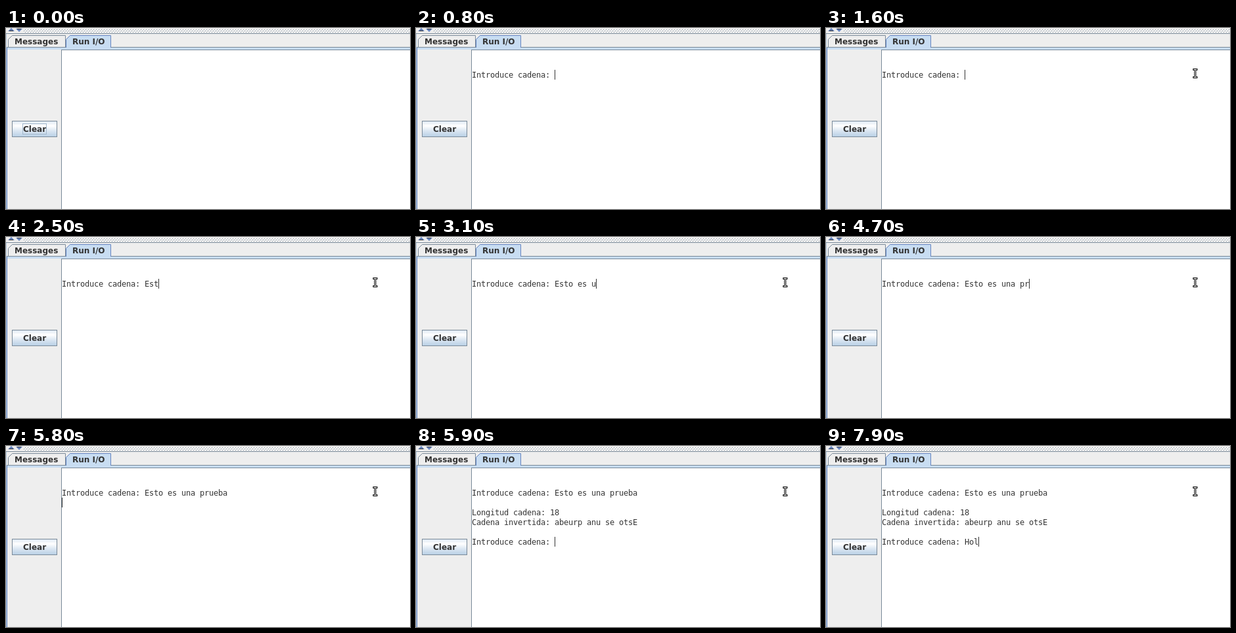
An HTML page that plays this animation: 615x277 px, repeating every 8000 ms.

```html
<!DOCTYPE html>
<html lang="es">
<head>
<meta charset="utf-8">
<title>Run I/O</title>
<style>
  html, body { margin: 0; width: 100%; height: 100%; overflow: hidden; background: #eee; }
  svg { position: absolute; left: 0; top: 0; display: block; }
  .label { font: bold 12px "DejaVu Sans", sans-serif; fill: #333; }
  .edge { fill: none; stroke: #7a8a99; }
  #console {
    position: absolute; left: 85px; top: 35px; margin: 0;
    font: 12px/15px "DejaVu Sans Mono", monospace;
    letter-spacing: calc(7px - 1ch); /* whole-pixel character cells */
    font-variant-ligatures: none;
    color: #333;
  }
  #caret { position: absolute; width: 1px; height: 15px; background: #333; }
  #focus { animation: focus 8s step-end infinite; }
  #beam { animation: beam 8s step-end infinite; }
  @keyframes focus { 0% { opacity: 1 } 7.5%, 100% { opacity: 0 } }
  @keyframes beam {
    0% { opacity: 0; transform: translate(556px, 49px) }
    16.25% { opacity: 1; transform: translate(556px, 49px) }
    17.5%, 100% { opacity: 1; transform: translate(562px, 69px) }
  }
</style>
</head>
<body>
<svg width="615" height="277" viewBox="0 0 615 277">
  <defs>
    <pattern id="bumps" width="4" height="4" patternUnits="userSpaceOnUse" y="1">
      <path d="M0 0h1v1h-1zM2 2h1v1h-1z" fill="#fff"/>
      <path d="M1 1h1v1h-1zM3 3h1v1h-1z" fill="#7a8a99"/>
    </pattern>
    <linearGradient id="metal" x2="0" y2="1">
      <stop offset="0" stop-color="#dde8f3"/>
      <stop offset=".3" stop-color="#fff"/>
      <stop offset=".6" stop-color="#dde8f3"/>
      <stop offset="1" stop-color="#b8cfe5"/>
    </linearGradient>
  </defs>
  <rect width="615" height="277" fill="#eee"/>

  <!-- split divider -->
  <rect x="26" y="1" width="589" height="6" fill="url(#bumps)"/>
  <path d="M3 5h10l-5-5z M15 1h10l-5 5z" fill="#6382bf"/>
  <path d="M5 4.5h6M17 1.5h6" stroke="#333"/>
  <path class="edge" d="M0 8.5H615"/>

  <!-- tabs and content frame -->
  <rect y="30" width="615" height="3" fill="#c8ddf2"/>
  <path class="edge" d="M0 29.5H615"/>
  <path class="edge" d="M3.5 29V17.5L9.5 11.5H90.5V29"/>
  <path d="M91.5 30V17.5L97.5 11.5H159.5V30" fill="#c8ddf2" stroke="#6382bf"/>
  <rect x="92" y="29" width="67" height="2" fill="#c8ddf2"/>
  <path d="M.5 9V277" stroke="#b8cfe5"/>
  <path d="M1.5 30V277" stroke="#6382bf"/>
  <text class="label" x="13" y="25">Messages</text>
  <text class="label" x="101" y="25">Run I/O</text>

  <!-- text area -->
  <rect x="84.5" y="33.5" width="540" height="260" fill="#fff" stroke="#7a8a99"/>

  <!-- button -->
  <rect x="9.5" y="142.5" width="68" height="24" fill="url(#metal)" stroke="#7a8a99"/>
  <text class="label" x="26" y="159">Clear</text>
  <rect id="focus" x="25.5" y="146.5" width="36" height="16" fill="none" stroke="#a3b8cc"/>

  <g id="beam" fill="none" stroke-linecap="square">
    <path d="M-2 -5.5H2M-2 6.5H2M0 -5.5V6.5" stroke="#000" stroke-width="3"/>
    <path d="M-2 -5.5H2M-2 6.5H2M0 -5.5V6.5" stroke="#fff"/>
  </g>
</svg>
<pre id="console"></pre>
<div id="caret"></div>

<script>
const LOOP = 8000;
const ask = "\n\nIntroduce cadena: ";
const phrase = "Esto es una prueba";
const first = ask + phrase;
const second = first + "\n\nLongitud cadena: 18\nCadena invertida: " +
  [...phrase].reverse().join("") + ask;
const typed = n => ask + phrase.slice(0, n);

// [start in ms, console text, caret shown]
const steps = [
  [0, "", false],
  [600, ask, false], [800, ask, true], [1200, ask, false], [1600, ask, true], [2200, ask, false],
  ...[1, 2, 3, 4, 5, 6].map(n => [2200 + 100 * n, typed(n), true]),
  [3000, typed(8), true], [3100, typed(9), true],
  [3400, typed(11), true], [3500, typed(12), true],
  // swapped letters, then erased
  [3700, typed(12) + "r", true], [3800, typed(12) + "rp", true],
  [4300, typed(12) + "r", true], [4400, typed(12), true],
  [4700, typed(14), true], [4800, typed(15), true], [4900, typed(16), true],
  [5100, first, true], [5600, first, false],
  [5800, first + "\n", true],
  [5900, second, true], [6400, second, false], [7100, second, true], [7500, second, false],
  [7700, second + "Ho", true], [7900, second + "Hol", true]
];

const output = document.getElementById("console");
const caret = document.getElementById("caret");
let shown;

function show(step) {
  const [, text, caretOn] = step;
  const lines = text.split("\n");
  output.textContent = text;
  caret.style.left = 85 + 7 * lines.at(-1).length + "px";
  caret.style.top = 34 + 15 * (lines.length - 1) + "px";
  caret.style.visibility = caretOn ? "visible" : "hidden";
}

// one clock for text and CSS animations
const animations = document.getAnimations();
animations.forEach(a => a.pause());
const origin = performance.now();

function frame() {
  const t = Math.max(0, performance.now() - origin) % LOOP;
  const step = steps.findLast(s => s[0] <= t);
  if (step !== shown) show(shown = step);
  animations.forEach(a => { a.currentTime = t; });
  requestAnimationFrame(frame);
}
frame();
</script>
</body>
</html>
```
